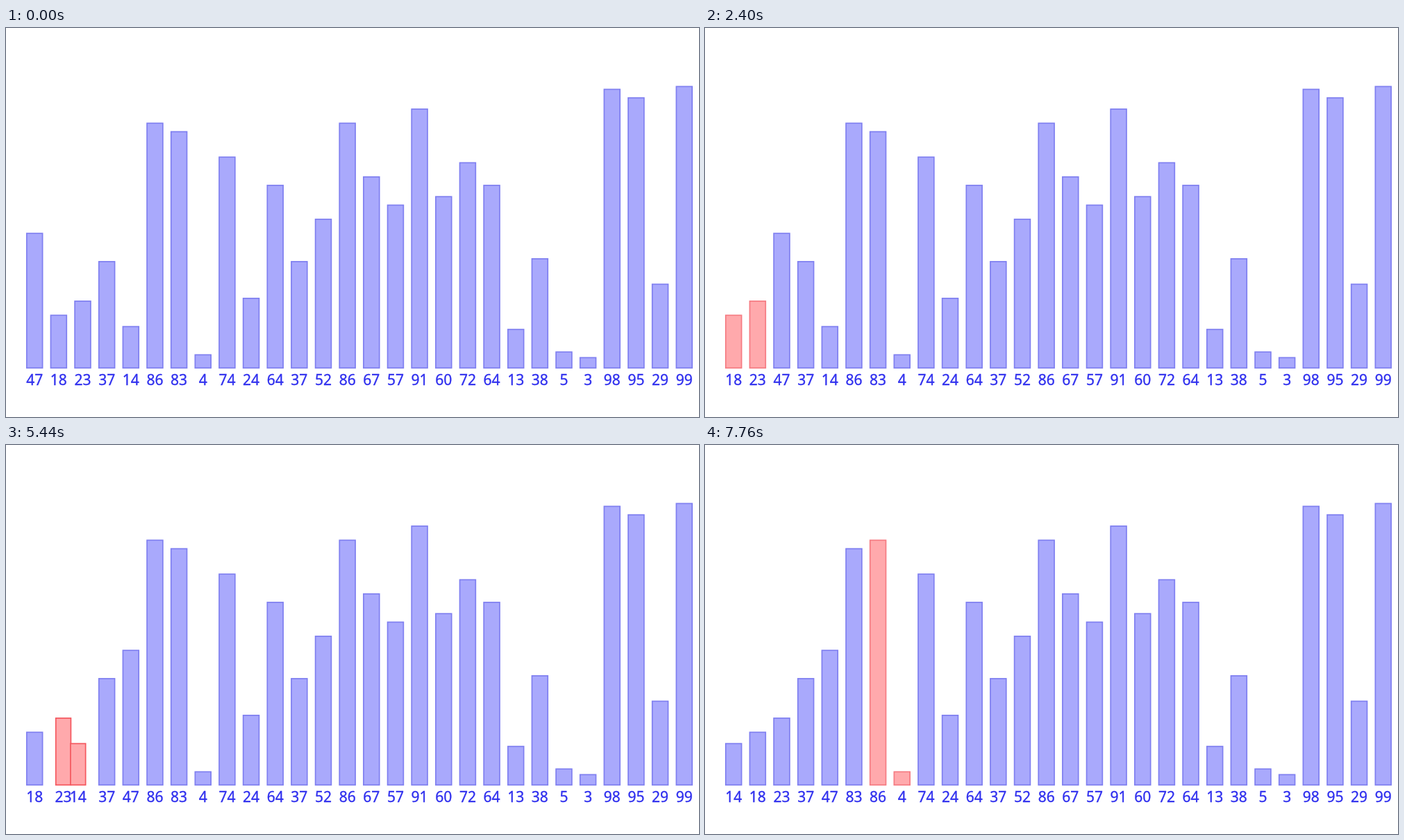
An HTML page that plays this animation: 998x561 px, repeating every 8000 ms.

```html
<!DOCTYPE html>
<html lang="en">
<head>
<meta charset="utf-8">
<title>Insertion sort</title>
<style>
  html, body { margin: 0; height: 100%; overflow: hidden; background: #fff; }
  svg { display: block; width: 100%; height: 100%; filter: blur(.5px); }
  rect { fill: #a9a9fc; stroke: #7f7ff0; stroke-width: 1.7px; }
  .hot rect { fill: #ffa9ac; stroke: #f57b82; }
  .moving rect { stroke: #f4585f; }
  text {
    font: 21px "Noto Sans", "Open Sans", sans-serif;
    fill: #3030ee; stroke: #3030ee; stroke-width: .35px; text-anchor: middle;
  }
</style>
</head>
<body>
<svg viewBox="0 0 998 561"></svg>
<script>
const LOOP = 8000, START = 995;
const HOLD = 340, MOVE = 340, SKIP = 320; // pause before a swap, swap, pair already in order
const X0 = 41.2, PITCH = 34.65, BASE = 490.3;
const values = [47, 18, 23, 37, 14, 86, 83, 4, 74, 24, 64, 37, 52, 86,
  67, 57, 91, 60, 72, 64, 13, 38, 5, 3, 98, 95, 29, 99];

const svg = document.querySelector("svg");

function add(parent, tag, attrs = {}) {
  const el = document.createElementNS("http://www.w3.org/2000/svg", tag);
  for (const key in attrs) el.setAttribute(key, attrs[key]);
  return parent.appendChild(el);
}

const bars = values.map(value => {
  const group = add(svg, "g");
  const top = 487.6 - 4.073 * value;
  const rect = add(group, "rect", { y: top, height: BASE - top });
  add(group, "text", { y: 515.2 }).textContent = value;
  return { value, group, rect };
});

function place({ group, rect }, slot, state = "") {
  const width = state.includes("moving") ? 21.7 : 22.8;
  group.setAttribute("class", state);
  group.setAttribute("transform", `translate(${X0 + PITCH * slot})`);
  rect.setAttribute("x", -width / 2);
  rect.setAttribute("width", width);
}

// Runs the sort up to time t: the order, the right slot of the compared pair, the swap progress.
function sortUntil(t) {
  const order = [...bars];
  let clock = START;
  if (t < clock) return { order, right: -1, shift: 0 };
  for (let i = 1; i < order.length; i++) {
    for (let j = i; j > 0; j--) {
      const swap = order[j - 1].value > order[j].value;
      const end = clock + (swap ? HOLD + MOVE : SKIP);
      if (t < end) {
        const shift = swap ? Math.max(0, (t - clock - HOLD) / MOVE) : 0;
        return { order, right: j, shift };
      }
      clock = end;
      if (!swap) break;
      [order[j - 1], order[j]] = [order[j], order[j - 1]];
    }
  }
  return { order, right: -1, shift: 0 };
}

function draw(t) {
  const { order, right, shift } = sortUntil(t);
  const state = shift ? "hot moving" : "hot";
  order.forEach((bar, i) => {
    if (i === right) place(bar, i - shift, state);
    else if (i === right - 1) place(bar, i + shift, state);
    else place(bar, i);
  });
}

const begin = performance.now();
function tick() {
  draw((performance.now() - begin) % LOOP);
  requestAnimationFrame(tick);
}
tick();
</script>
</body>
</html>
```
